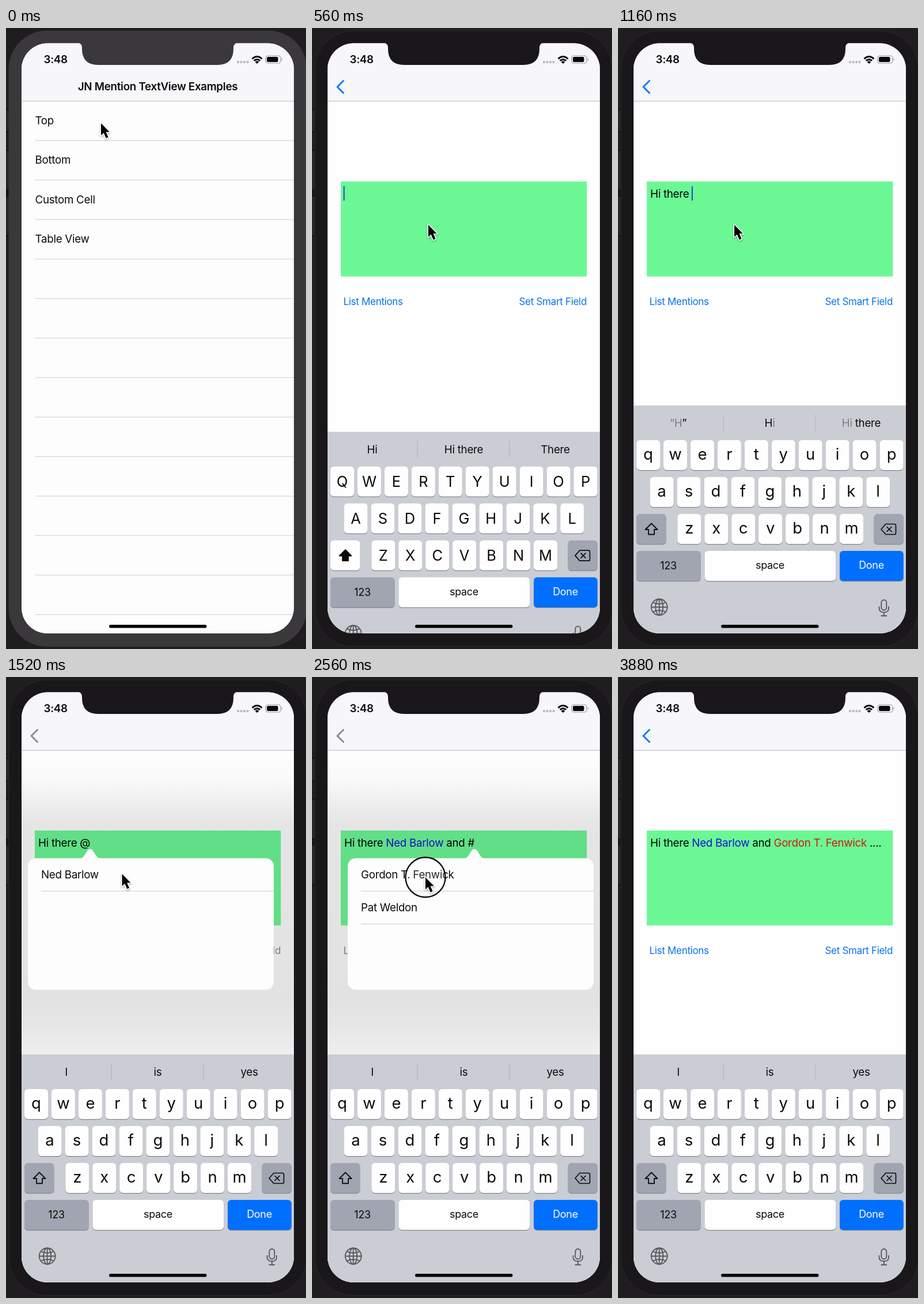
Recreate the animation shown at these times as an HTML page. Size 521 by 1076 pixels, loop 3920 ms.

```html
<!DOCTYPE html>
<html lang="en">
<head>
<meta charset="utf-8">
<title>Mention text view demo</title>
<style>
html, body { margin: 0; width: 521px; height: 1076px; overflow: hidden; background: #1f1d1f; }
svg { display: block; }
text { font-family: Inter, Roboto, sans-serif; font-size: 18.8px; letter-spacing: -.3px; white-space: pre; }
.mid { text-anchor: middle; }
.end { text-anchor: end; }
.bold { font-weight: 600; }
.link { font-size: 17.1px; letter-spacing: -.35px; }
.cap { font-size: 25.5px; letter-spacing: 0; }
.low { font-size: 27.5px; letter-spacing: 0; }
.key { font-size: 18px; }
.line { fill: none; stroke: #54565b; stroke-width: 1.8; }
</style>
</head>
<body>
<svg id="stage" width="521" height="1076" viewBox="0 0 521 1076"></svg>
<script>
const LOOP = 3920;
const BLUE_NAME = 'Ned Barlow', RED_NAME = 'Gordon T. Fenwick', OTHER_NAME = 'Pat Weldon';

const clamp = (v, a = 0, b = 1) => Math.min(b, Math.max(a, v));
const span = (t, a, b) => clamp((t - a) / (b - a));
const easeOut = p => 1 - (1 - p) ** 3;
const easeInOut = p => p * p * (3 - 2 * p);
const within = (t, a, b) => t >= a && t < b;

const rect = (x, y, w, h, fill, more = '') =>
  `<rect x="${x}" y="${y}" width="${w}" height="${h}" fill="${fill}" ${more}/>`;
const label = (x, y, s, cls = '', fill = '#0b0b0c') =>
  `<text x="${x}" y="${y}" class="${cls}" fill="${fill}">${s}</text>`;
const hline = (x1, x2, y, color) => rect(x1, y - .6, x2 - x1, 1.2, color);

function key(x, y, w, fill = '#fefefe', id = '') {
  return rect(x, y + 1.3, w, 52, '#86888d', 'rx="6"') +
    rect(x, y, w, 52, fill, `rx="6" ${id && `id="${id}"`}`);
}

function listView() {
  const names = ['Top', 'Bottom', 'Custom Cell', 'Table View'];
  let s = rect(27, 127, 473, 922, '#fefdfe') + rect(27, 128, 473, 67, '#d4d3d8', 'id="hit"');
  for (let i = 0; i < 13; i++) s += hline(50.5, 500, 195 + i * 68.45, '#d5d4d8');
  names.forEach((n, i) => s += label(50.5, 167 + i * 68.45, n));
  return s;
}

function editView() {
  return rect(27, 127, 473, 922, '#fefefe') +
    rect(50, 266, 427.3, 164.5, '#6bf894') +
    '<text id="typed" x="56" y="294"><tspan></tspan><tspan fill="#1a10d8"></tspan><tspan></tspan>' +
    '<tspan fill="#d01a10"></tspan><tspan></tspan></text>' +
    rect(0, 274, 2.2, 25, '#2a52c8', 'id="caret"') +
    label(54.5, 480, 'List Mentions', 'link tint') +
    label(477, 480, 'Set Smart Field', 'link end tint');
}

function keyboard() {
  const pitch = 46.95, rows = [['qwertyuiop', 32, 714], ['asdfghjkl', 55.6, 778], ['zxcvbnm', 103.3, 842]];
  let s = rect(27, 654, 473, 396, '#cacdd4'), caps = '', lows = '';
  for (const [chars, x0, y] of rows) {
    [...chars].forEach((c, i) => {
      const x = x0 + i * pitch;
      s += key(x, y, 41);
      caps += label(x + 20.5, y + 35.3, c.toUpperCase(), 'cap mid');
      lows += label(x + 20.5, y + 34.3, c, 'low mid');
    });
  }
  s += `<g id="caps">${caps}</g><g id="lows">${lows}</g>`;
  s += [183, 343].map(x => rect(x - .6, 670, 1.2, 29, '#b4b7be')).join('');
  s += [104.5, 263.5, 422.5].map(x => label(x, 691, '', 'mid hint')).join('');
  s += key(32, 842, 51.5, '#a1a5b1', 'shift') + key(444.5, 842, 51.3, '#a1a5b1') +
    key(32, 906, 111.7, '#a1a5b1') + key(150.5, 906, 227.5) + key(385, 906, 110.8, '#006ffe');
  s += label(87.5, 938, '123', 'key mid') + label(264, 937, 'space', 'key mid') +
    label(440, 937, 'Done', 'key mid', '#fff');
  s += '<path id="arrow" d="M58 858.5L68.5 869H63V877.5H53V869H47.5Z" stroke="#0b0b0c" stroke-width="1.8" stroke-linejoin="round"/>';
  s += '<path d="M465 859.5H480Q482.500 859.5 482.500 862V875Q482.500 877.500 480 877.500H465L457 868.500ZM467 864.500L475 872.500M475 864.500L467 872.500" fill="none" stroke="#0b0b0c" stroke-width="1.7" stroke-linejoin="round" stroke-linecap="round"/>';
  s += '<g class="line"><circle cx="71.700" cy="1003.500" r="14"/><ellipse cx="71.700" cy="1003.500" rx="6.600" ry="14"/>' +
    '<path d="M57.700 1003.500H85.700M71.700 989.500V1017.500M61 995.500Q71.700 1000.500 82.400 995.500M61 1011.500Q71.700 1006.500 82.400 1011.500"/>' +
    '<rect x="457.300" y="991" width="9" height="17.500" rx="4.500"/><path d="M453.500 1002V1005Q453.500 1012.500 461.800 1012.500T470 1005V1002M461.800 1012.500V1018.500M456.500 1018.500H467"/></g>';
  return s;
}

function popup() {
  const row = (i, id) => `<text id="${id}" x="23" y="${35 + 57 * i}" fill="#0b0b0c"></text>`;
  return '<path id="tail" d="M-18 .5C-9 .5-7-16 0-16S9 .5 18 .5Z" fill="#fefdfe"/>' +
    rect(0, 0, 427, 228, '#fefdfe', 'rx="14"') + hline(23, 427, 57, '#d2d1d5') +
    `<g id="row2">${hline(23, 427, 114, '#d2d1d5')}</g>` + row(0, 'name1') + row(1, 'name2');
}

function statusBar() {
  let s = label(65.5, 61, '3:48', 'bold');
  for (let i = 0; i < 4; i++) s += `<circle cx="${403 + i * 5.5}" cy="59" r="2.200" fill="#bdbcc0"/>`;
  s += '<g fill="none" stroke="#0b0b0c" stroke-width="2.900"><path d="M427.500 53.300Q436 45.700 444.500 53.300M430.700 56.700Q436 52.300 441.300 56.700"/></g>' +
    '<path d="M432.600 58.700Q436 56 439.400 58.700L436 62Z" fill="#0b0b0c"/>';
  return s + rect(451, 48, 26, 13, 'none', 'rx="4" stroke="#99989c" stroke-width="1.2"') +
    rect(453, 50, 19.5, 9, '#0b0b0c', 'rx="2.200"') +
    '<path d="M478.800 52Q481.300 54.500 478.800 57Z" fill="#99989c"/>';
}

const shadeStops = [[0, 0], [.1, .02], [.16, .055], [.24, .1], [.82, .11], [.9, .095], [1, .06]];
const stage = document.getElementById('stage');
stage.innerHTML = `
<defs>
  <clipPath id="screen"><rect x="27" y="26.500" width="473" height="1022.500" rx="45"/></clipPath>
  <linearGradient id="dim" x2="0" y2="1">${shadeStops.map(([o, a]) =>
    `<stop offset="${o}" stop-color="#0a000a" stop-opacity="${a}"/>`).join('')}</linearGradient>
  <filter id="soft" x="-50%" y="-50%" width="200%" height="200%"><feDropShadow dx="0" dy="1.500" stdDeviation="1.500" flood-opacity=".35"/></filter>
</defs>
${rect(0, 0, 521, 1076, '#1f1d1f')}
${[[141, 39], [212, 69], [291, 69]].map(([y, h]) =>
  rect(-4, y, 11, h, '#272527', 'stroke="#0b0a0b" stroke-width="1.500"')).join('')}
${rect(-2, 282, 7, 8, '#171517')}
<rect id="bezel" x="5" y="5" width="517" height="1066.500" rx="66" stroke-width="1"/>
<g clip-path="url(#screen)">
  ${rect(27, 26, 473, 1024, '#fefdfe')}
  <g id="list">${listView()}</g>
  <g id="edit">${editView()}</g>
  <g id="shade">${rect(27, 128, 473, 526, 'url(#dim)')}</g>
  ${rect(27, 26, 473, 101, '#f7f6f9')}${hline(27, 500, 127, '#c6c5c9')}
  <g id="title">${label(263.5, 108, 'JN Mention TextView Examples', 'bold mid')}</g>
  <path id="back" d="M54.500 91.500L44 102L54.500 112.500" fill="none" stroke-width="3" stroke-linecap="round" stroke-linejoin="round"/>
  ${statusBar()}
  <g id="keys">${keyboard()}</g>
  <g id="popup">${popup()}</g>
  ${rect(179, 1034, 169.5, 5.6, '#050505', 'rx="2.800"')}
</g>
<path id="notch" d="M125 25.500Q132 27 132 34V36Q132 64 160 64H367Q395 64 395 36V34Q395 27 402 25.500Z"/>
<g id="mouse">
  <circle id="ring" r="34.500" fill="#fff" fill-opacity=".12" stroke="#0b0b0c" stroke-width="2.300"/>
  <path filter="url(#soft)" d="M0 0V21L4.700 16.700L8.700 26L12.600 24.300L8.600 15.200H14.900Z" fill="#050505" stroke="#fff" stroke-width="3" paint-order="stroke" stroke-linejoin="round"/>
</g>`;

const $ = id => document.getElementById(id);
const set = (el, name, v) => el.setAttribute(name, v);
const fade = (id, a) => { set($(id), 'opacity', a); };
const show = (id, on) => { $(id).style.display = on ? '' : 'none'; };
const move = (id, x, y) => set($(id), 'transform', `translate(${x} ${y})`);
const mix = (a, b, p) => `rgb(${a.map((v, i) => Math.round(v + (b[i] - v) * p))})`;

const GREET = { text: 'Hi there ', at: 720, step: 48 };
const JOIN = { text: 'and ', at: 1920, step: 60 };
const DOTS = { text: '....', at: 2860, step: 60 };
const typed = (w, t) => w.text.slice(0, clamp(Math.floor((t - w.at) / w.step) + 1, 0, w.text.length));

const strokes = [GREET, JOIN, DOTS].flatMap(w => [...w.text].map((_, i) => w.at + i * w.step));
const edits = [460, 1320, 1630, 2280, 2640, ...strokes].sort((a, b) => a - b);

// A tilde marks a part that is still faint
const hints = [
  [0, 'Hi', 'Hi there', 'There'],
  [1140, '~“~H”', 'H~i', '~H~i there'],
  [1200, 'is', 'was', 'should'],
  [1340, 'I', 'is', 'yes'],
  [1760, 'is', 'was', 'should'],
  [2200, 'I', 'is', 'yes'],
  [2680, 'is', 'was', 'should'],
  [2900, 'Hi', 'Hi there', 'There'],
  [3440, 'I', 'is', 'yes']
];

const path = [
  [0, 165, 165], [240, 165, 165], [400, 202, 341], [1500, 202, 341], [1640, 194, 345],
  [2300, 194, 345], [2440, 197, 347], [3640, 197, 347], [3760, 250, 195]
];
const clicks = [[40, 160], [420, 480], [1640, 1720], [2520, 2600]];

function pointer(t) {
  let i = 0;
  while (i < path.length - 2 && t >= path[i + 1][0]) i++;
  const [ta, xa, ya] = path[i], [tb, xb, yb] = path[i + 1], p = easeInOut(span(t, ta, tb));
  return [xa + (xb - xa) * p, ya + (yb - ya) * p];
}

function drawText(t) {
  const parts = [
    typed(GREET, t) + (within(t, 1320, 1720) ? '@' : ''),
    t >= 1720 ? BLUE_NAME : '',
    (t >= 1720 ? ' ' : '') + typed(JOIN, t) + (within(t, 2280, 2640) ? '#' : ''),
    t >= 2640 ? RED_NAME : '',
    (t >= 2640 ? ' ' : '') + typed(DOTS, t)
  ];
  const el = $('typed');
  parts.forEach((s, i) => { el.children[i].textContent = s; });
  const any = parts.some(Boolean);
  return any ? 56 + el.getComputedTextLength() : 55;
}

function drawHints(t) {
  const words = hints.filter(h => h[0] <= t).pop().slice(1);
  document.querySelectorAll('.hint').forEach((el, i) => {
    const html = words[i].replace(/~(.)/g, '<tspan fill-opacity=".4">$1</tspan>');
    if (el.dataset.s !== html) { el.innerHTML = html; el.dataset.s = html; }
  });
}

function draw(ms) {
  const t = Math.floor(ms / 40) * 40;
  const bezel = t < 80 ? '#3a383b' : '#1a171a';
  set($('bezel'), 'fill', bezel);
  set($('bezel'), 'stroke', t < 80 ? '#3a383b' : '#2b292b');
  set($('notch'), 'fill', bezel);

  const push = easeInOut(span(t, 160, 400));
  show('hit', t >= 80);
  show('list', push < 1);
  show('edit', push > 0);
  move('list', -142 * push, 0);
  move('edit', 473 * (1 - push), 0);
  move('title', -210 * push, 0);
  fade('title', 1 - span(push, 0, .8));
  fade('back', span(push, .3, 1));
  move('keys', 0, 395 * (1 - easeOut(span(t, 460, 655))));
  show('keys', t > 460);

  const caps = t < GREET.at;
  show('caps', caps);
  show('lows', !caps);
  set($('shift'), 'fill', caps ? '#fefefe' : '#a1a5b1');
  set($('arrow'), 'fill', caps ? '#0b0b0c' : 'none');
  drawHints(t);

  const second = t >= 2000;
  const open = second ? span(t, 2300, 2380) - span(t, 2620, 2700) : span(t, 1340, 1420) - span(t, 1700, 1780);
  const end = drawText(t);
  const tip = clamp(end, 62, 465);
  fade('shade', open);
  show('popup', open > 0);
  fade('popup', open);
  if (open > 0 && !(within(t, 1720, 2000) || t >= 2640)) {
    draw.tip = tip;
  }
  const anchor = draw.tip || tip, left = clamp(anchor - 213.5, 38, 62);
  move('popup', left, 314);
  move('tail', anchor - left, 0);
  $('name1').textContent = second ? RED_NAME : BLUE_NAME;
  $('name2').textContent = second ? OTHER_NAME : '';
  show('row2', second);
  set($('back'), 'stroke', mix([15, 123, 246], [140, 140, 144], open));
  document.querySelectorAll('.tint').forEach(el => set(el, 'fill', mix([8, 116, 232], [138, 138, 141], open)));

  const since = t - (edits.filter(e => e <= t).pop() ?? t);
  const blink = clamp(.7 + 1.5 * Math.cos(since / 560 * 2 * Math.PI));
  set($('caret'), 'x', end - .5);
  fade('caret', t < 460 ? 0 : blink * (1 - open));

  const [x, y] = pointer(t);
  move('mouse', x, y);
  show('mouse', t <= 3760);
  show('ring', clicks.some(([a, b]) => within(t, a, b)));
}

const start = performance.now();
function tick() {
  draw((performance.now() - start) % LOOP);
  requestAnimationFrame(tick);
}
draw(0);
tick();
</script>
</body>
</html>
```
